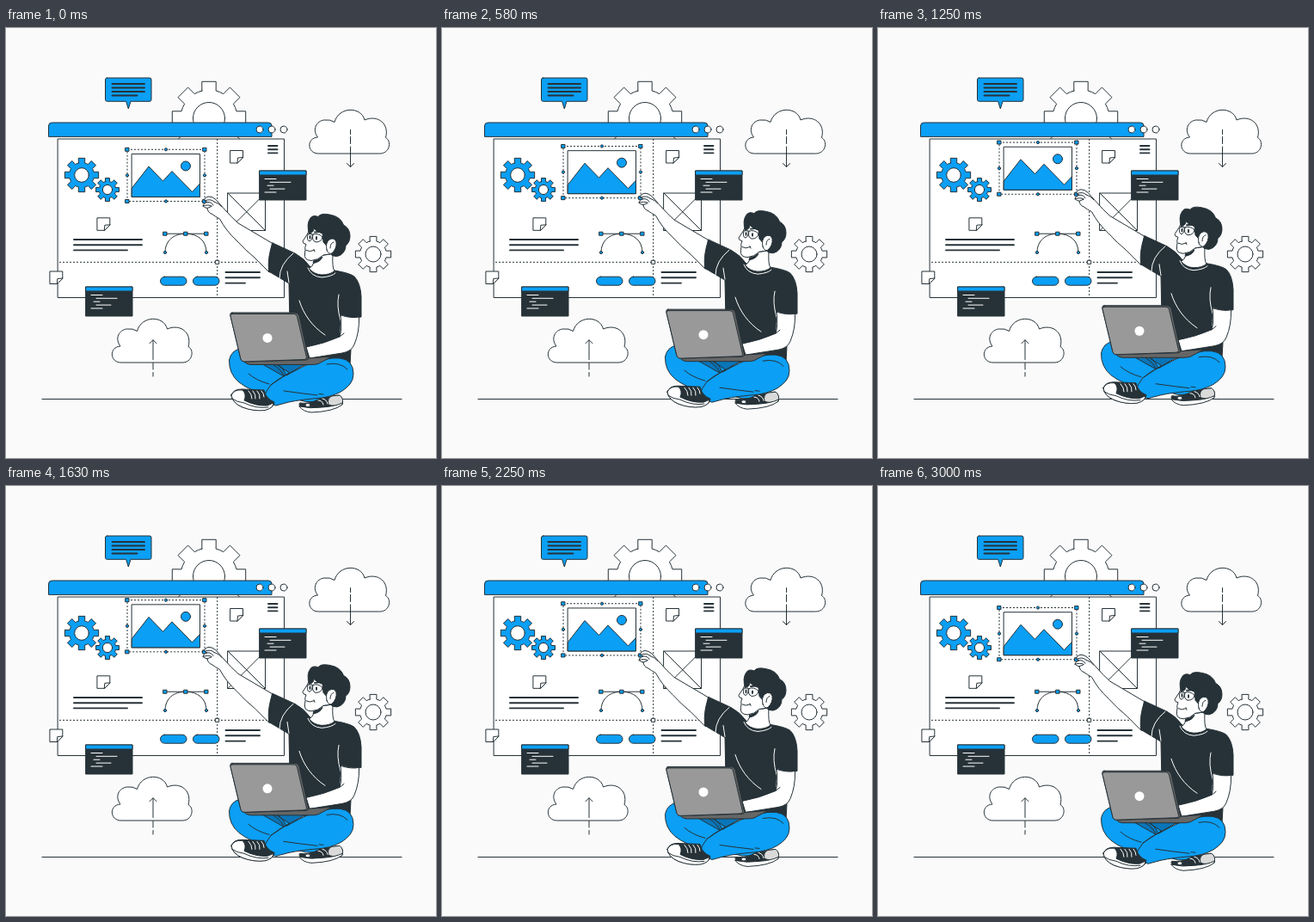
Animation of 500 by 500 pixels, one loop 3040 ms. Source, as an HTML page:

```html
<!DOCTYPE html>
<html lang="en">
<head>
<meta charset="utf-8">
<title>Designer at work</title>
<style>
  html, body { margin: 0; width: 100%; height: 100%; overflow: hidden; background: #fafafa; }
  svg { display: block; width: 100vw; height: 100vh; }
  svg * { stroke-linecap: round; stroke-linejoin: round; }
  .w { fill: #fff; }
  .b { fill: #0b9ff5; }
  .d { fill: #263238; }
  .n { fill: none; }
  .bold { fill: none; stroke-width: 1.9; }
  .dots { fill: none; stroke-dasharray: 2 2; stroke-linecap: butt; }
  .light { fill: none; stroke: #fff; }
</style>
</head>
<body>
<svg viewBox="0 0 500 500" stroke="#263238" stroke-width="1">
  <defs>
    <path id="cloud" class="w" d="M363 146C350 146 349 128 362.500 127C355.500 118 361 108 370 107Q377 106 382 109.500C387 91 413 91 417 107C432 100.500 446 111 441.500 127.500C449 132 446 146 435 146Z"/>
    <g id="note">
      <path class="w" d="M0 0H14.500V8L8 14.500H0Z"/>
      <path class="w" d="M8 14.500L8.500 8.500L14.500 8Z"/>
    </g>
    <g id="code">
      <path class="d" d="M0 0H54V34H0Z"/>
      <path class="b" d="M0 0H54V5H0Z"/>
      <path class="light" d="M6 9.500H19M12 13.300H36M9 17.200H16M12 21.100H29M6 25H19"/>
    </g>
    <path id="knob" class="b" d="M-2-2H2V2H-2Z"/>
    <circle id="dot" class="b" r="1.600"/>
  </defs>

  <path class="n" d="M42 431.500H460"/>
  <g id="backGear"></g>

  <!-- board -->
  <path class="w" d="M60.500 129H323.500V313.500H60.500Z"/>
  <path class="b" d="M49.500 126V114Q49.500 110 53.500 110H305Q309 110 309 114V126Z"/>
  <circle class="w" cx="295" cy="118" r="4"/>
  <circle class="w" cx="309" cy="118" r="4"/>
  <circle class="w" cx="323" cy="118" r="4"/>
  <path class="bold" d="M305 137H315.500M305 141.200H315.500M305 145.400H315.500"/>
  <path class="bold" d="M79 246H158M79 252.200H158M79 258.400H141M255.500 284H295M255.500 290.300H295M255.500 296.600H278"/>
  <path class="dots" d="M245.700 129V313M62 272.300H323"/>
  <path class="w" d="M243.700 270.300h4v4h-4Z"/>
  <rect class="b" x="179.500" y="289.200" width="30.500" height="10" rx="5"/>
  <rect class="b" x="217.500" y="289.200" width="30.500" height="10" rx="5"/>
  <path class="w" d="M258 192H301.500V235.500H258ZL301.500 235.500M301.500 192L258 235.500"/>
  <path class="n" d="M185 239.200H233M185 261C185 247 195 239.200 209 239.200S233 247 233 261"/>
  <use href="#knob" x="185" y="239.200"/><use href="#knob" x="209" y="239.200"/><use href="#knob" x="233" y="239.200"/>
  <use href="#dot" x="185" y="261"/><use href="#dot" x="233" y="261"/>
  <use href="#note" x="261" y="142.500"/><use href="#note" x="106.300" y="220.800"/><use href="#note" x="51.300" y="283"/>
  <g id="gears"></g>

  <use href="#code" x="295" y="166"/>
  <use href="#code" x="93" y="301"/>

  <!-- speech bubble -->
  <path class="b" d="M117.500 58H167Q169 58 169 60V83.300Q169 85.300 167 85.300H145L142.300 94L139.600 85.300H117.500Q115.500 85.300 115.500 83.300V60Q115.500 58 117.500 58Z"/>
  <path class="bold" d="M123.500 65H161M123.500 69.500H161M123.500 74H161M123.500 78.500H152.500"/>

  <use href="#cloud"/>
  <path class="n" d="M400.500 118.500V123.500M400.500 126.500V134.500M400.500 138V161.300M396.500 157.500L400.500 161.500L404.500 157.500"/>
  <use href="#cloud" x="-229.500" y="243"/>
  <path class="n" d="M171 405V400.500M171 397V389.500M171 385.500V363M167 366.700L171 362.700L175 366.700"/>

  <g id="float">
    <!-- selected picture -->
    <path class="w" d="M146.500 146.500H225.500V196.500H146.500Z"/>
    <path class="b" d="M146.500 186L166 161L182.500 178L193 166.500L216.500 190.500L225.500 181V196.500H146.500Z"/>
    <circle class="b" cx="209" cy="160.500" r="5.500"/>
    <path class="dots" d="M141 141.300H231V201.500H141Z"/>
    <g id="handles"></g>

    <!-- raised arm -->
    <path class="w" d="M309 250L270 227Q262 220 252 208.500L244 199.500Q240 196 236 196Q230 197 231 201L234 202.500Q229 204 229 207Q231 209 234 209.500Q235 215 239 216Q243 219 248.500 222Q256 236 268 247Q278 258 289 267L306 284Z"/>
    <path class="n" d="M231 201Q238 198 242 202M234 202.500Q239 202 241 206M229 207Q235 205 239 207M234 209.500L239 207.500M242 202Q248 204 251 208"/>

    <!-- torso and neck -->
    <path class="d" d="M310 250L336 262Q347 268 354 278L382 282Q400 285 405 289Q412 296 413 312V336Q403 338 389 333L388 354L401 374L400 392H331L329 297L305.500 283Q304 266 310 250Z"/>
    <path class="light" d="M334 262Q318 275 318 291M327 283L329 296M341 317C346 333 356 347 371 357M387 310Q384 323 389 340M351 279Q355 289 367 290Q379 289 383 285"/>
    <path class="w" d="M359 266L358 273Q356 278 352.500 279.500Q358 286.500 367 287Q377 287 382 282.500Q379 279 380 263Z"/>
    <path class="d" d="M358 270.500Q363 269.500 368 266Q366 272 357.500 273.500Z"/>

    <!-- head -->
    <path class="w" d="M354 232Q351 240 345 248Q345 251 349 251.500Q347 256 348 258L347.500 262Q346 270 355 270.500Q363 270 369 264L383 262V235L366 229Z"/>
    <path class="d" d="M352.500 239Q349 228 354 221Q357 217 363 219.500Q366 215 376 217Q389 219 392.500 229Q400 233 400 242Q400 249 395 253Q395 260 389 264Q385 267 379 264.500L377 258L369 249L368 239Q361 237 358 233Q358 238 352.500 239Z"/>
    <path class="w" d="M373 258Q371 250 376 246Q382 243 384 249Q385 256 379 262Q375 264 373 258Z"/>
    <path class="n" d="M377 256Q377 250 381 249M351 240Q349 247 353 248Q357 246 356 240ZM357 240Q355 247 360 249Q367 249 368 243Q363 238 357 240ZM368 243L375 246M349 258.500Q353 261 358 258.500M358 257.500L359 260"/>
    <path class="bold" d="M353.500 242V244.500M361 243V245.500M359 237.500L364 237"/>

    <!-- legs -->
    <path class="b" d="M272 373Q262 375 259.500 386Q259 402 271 412Q285 423 303 425L339 432Q359 440 376 426L350 405L323 386Z"/>
    <path fill="#0a75b8" d="M293 388L323 405L350 390Z"/>
    <path class="b" d="M308 387Q321 391 326 404L339 397Q357 387 379 384Q399 382 403 395Q407 410 395 419Q386 427 368 430Q343 432 329 435L314 439Q306 437 299 432Q302 422 308 415L329 401Z"/>
    <path class="n" d="M323 422Q344 425 362 427M364 425.500L369 426M308 415Q317 407 329 402M305 389Q317 393 323 404M282 402Q291 410 306 414M373 391Q389 388 397 397"/>

    <!-- shoes -->
    <path class="d" d="M262 427Q264 420 274 420L300 421Q302 431 312 435Q312 441 302 444Q289 446 275 441Q263 436 262 427Z"/>
    <path class="w" d="M262 427Q265 420 275 421Q280 426 277 433Q291 440 304 439L311 436Q311 442 301 444.500Q288 446 275 441Q263 436 262 427Z"/>
    <path class="n" d="M263 431Q268 435 277 436Q291 443 305 441"/>
    <path class="light" d="M282 422Q286 426 286 431M287 422Q291 426 290 431M292 422Q296 426 295 431M297 422Q300 425 300 429"/>
    <path class="d" d="M342 436Q352 438 365 431L387 427Q393 430 391 438Q378 445 354 446Q343 444 341 438Z"/>
    <path fill="#dadada" d="M375 438Q373 430 379 428L388 427Q393 431 391 437Q383 441 375 438Z"/>
    <path class="w" d="M341 440Q354 443 368 441Q383 440 391 436V438Q381 446 355 447Q345 446 341 440Z"/>
    <path class="light" d="M363 433Q368 433 369 438M368 431Q373 432 374 437"/>
    <ellipse class="w" cx="351" cy="438.500" rx="3" ry="2"/>

    <!-- forearm -->
    <path class="w" d="M389 334Q402 338 410.500 336Q411 354 405 368Q402 376 391 378L353 384L349 371Q370 367 388 359Q391 350 389 334Z"/>
    <path class="n" d="M388 359L393 355"/>

    <!-- laptop -->
    <path fill="#666" d="M276 387L352 384L379 382L363 390.500Q360 391.500 355 391.500H284Q279 391 276 387Z"/>
    <path fill="#666" d="M263 331H336Q340 331 341 335L351.500 383Q352 386 349 386L277 388Q274 388 273 385L261 335Q260 331 263 331Z"/>
    <path fill="#999" d="M263 332.500H335Q337.500 332.500 338.500 335.500L349.500 383Q350 385 347 385.500L277 388Q274 388 273 385L261 335Q260.500 332.500 263 332.500Z"/>
    <circle class="w" cx="304" cy="360.500" r="5.500" stroke="none"/>
  </g>
</svg>
<script>
const byId = id => document.getElementById(id);

// A cog with eight teeth, one pointing straight up, and a round hole.
function gear(x, y, outer, inner, hole, cls) {
  const at = (r, a) => `${x + r * Math.sin(a)} ${y - r * Math.cos(a)}`;
  let d = '';
  for (let i = 0; i < 8; i++) {
    const a = i * Math.PI / 4;
    d += i ? `A${inner} ${inner} 0 0 1 ` : 'M';
    d += `${at(inner, a - 0.25)}L${at(outer, a - 0.19)}L${at(outer, a + 0.19)}L${at(inner, a + 0.25)}`;
  }
  d += `A${inner} ${inner} 0 0 1 ${at(inner, -0.25)}Z`;
  return `<path class="${cls}" d="${d}"/><circle class="w" cx="${x}" cy="${y}" r="${hole}"/>`;
}

byId('backGear').innerHTML = gear(236, 105, 43.5, 33, 18.5, 'w');
byId('gears').innerHTML = gear(88, 171, 20, 14.5, 8.3, 'b')
  + gear(118, 188, 13.7, 9.8, 5.6, 'b') + gear(427, 263, 21, 15.5, 9, 'w');

// Squares on the corners of the selection, dots on the middles of its sides.
let handles = '';
for (const x of [141, 186, 231]) {
  for (const y of [141.3, 171.4, 201.5]) {
    const mids = (x === 186) + (y === 171.4);
    if (mids < 2) handles += `<use href="#${mids ? 'dot' : 'knob'}" x="${x}" y="${y}"/>`;
  }
}
byId('handles').innerHTML = handles;

const LOOP = 3040, LEAD = 50, RISE = 10;
const float = byId('float');
const start = performance.now();

function draw() {
  const p = (performance.now() - start + LEAD) / LOOP % 1;
  const lift = RISE * (1 - Math.abs(2 * p - 1));
  float.setAttribute('transform', `translate(0 ${0.3 - lift})`);
  requestAnimationFrame(draw);
}
draw();
</script>
</body>
</html>
```
